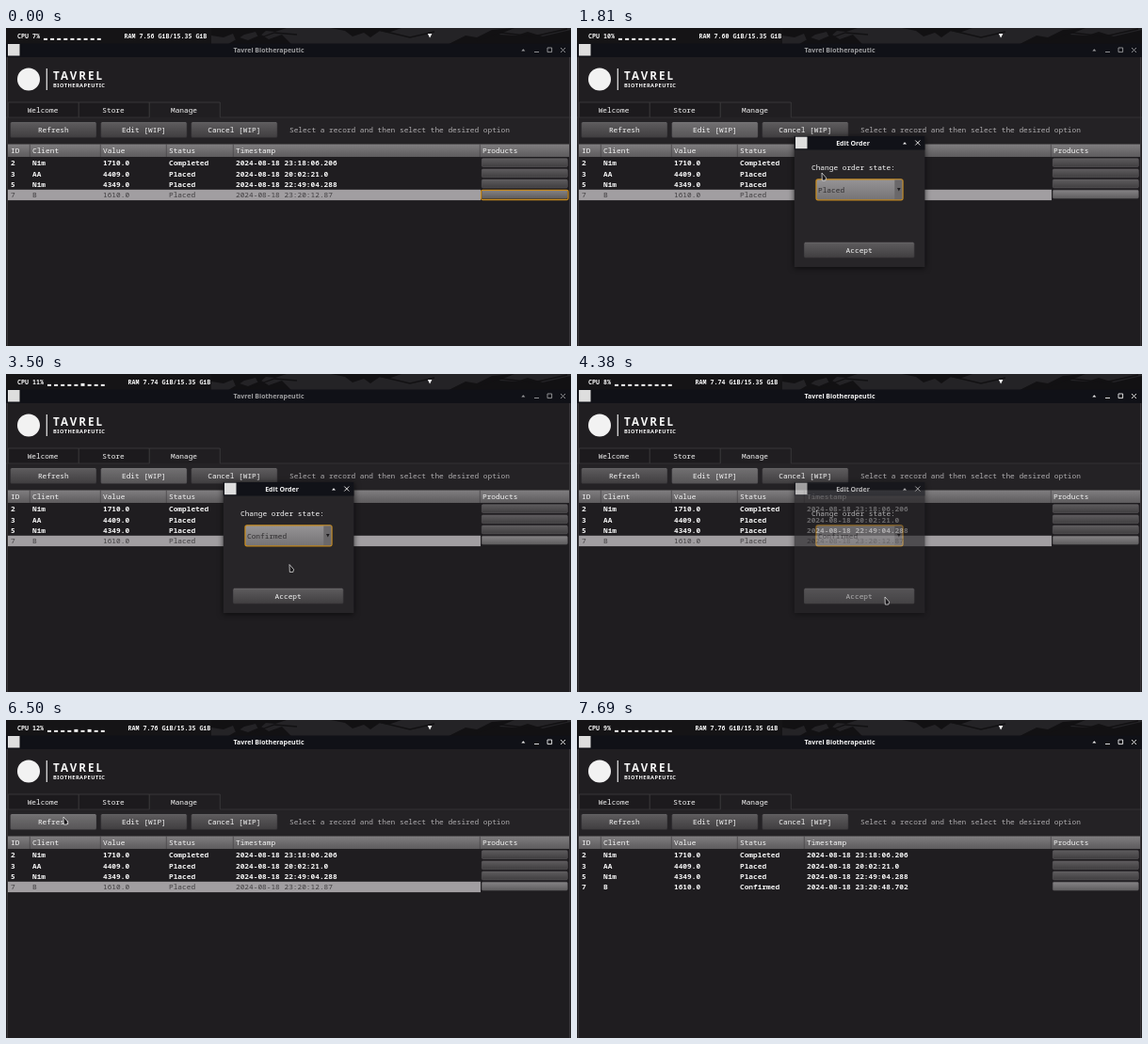
These frames come from a looping animation (600 px wide and 338 px high, 8 s). An HTML page:

```html
<!DOCTYPE html>
<html lang="en">
<head>
<meta charset="utf-8">
<title>Order manager</title>
<style>
html, body { margin: 0; width: 100%; height: 100%; overflow: hidden; background: #201e21; }
svg { display: block; width: 600px; height: 338px; }
text { font: 500 7.81px "Noto Sans Mono", monospace; fill: #f6f6f6; white-space: pre; }
.sans { font: 600 7px "Noto Sans", "Open Sans", sans-serif; }
.stat { font-size: 6.67px; font-weight: 700; }
.cell { font-weight: 600; }
.mid { text-anchor: middle; }
.window { filter: drop-shadow(0 1px 3px #000a); }
</style>
</head>
<body>
<svg id="stage" viewBox="0 0 600 338">
  <defs>
    <linearGradient id="btn" x2="0" y2="1"><stop stop-color="#5e5c5e"/><stop offset="1" stop-color="#403e40"/></linearGradient>
    <linearGradient id="lit" x2="0" y2="1"><stop stop-color="#858385"/><stop offset="1" stop-color="#5f5d5f"/></linearGradient>
    <linearGradient id="combo" x2="0" y2="1"><stop stop-color="#969496"/><stop offset="1" stop-color="#757375"/></linearGradient>
    <linearGradient id="head" x2="0" y2="1"><stop stop-color="#807e80"/><stop offset="1" stop-color="#5d5b5d"/></linearGradient>
  </defs>
</svg>
<script>
const stage = document.getElementById('stage');
const LOOP = 8000, STEP = 62.5;
const ORANGE = '#c58a20';

function add(tag, attrs, parent = stage) {
  const el = document.createElementNS('http://www.w3.org/2000/svg', tag);
  for (const k in attrs) el.setAttribute(k, attrs[k]);
  return parent.appendChild(el);
}
const rect = (x, y, width, height, fill, parent, more) =>
  add('rect', { x, y, width, height, fill, ...more }, parent);
const line = (d, stroke, parent, w = 1) =>
  add('path', { d, stroke, fill: 'none', 'stroke-width': w }, parent);
function text(x, y, str, cls = '', fill = '', parent) {
  const el = add('text', { x, y, class: cls }, parent);
  if (fill) el.style.fill = fill;
  el.textContent = str;
  return el;
}
const group = (parent, cls = '') => add('g', { class: cls }, parent);
const show = (el, on) => el.setAttribute('visibility', on ? 'visible' : 'hidden');

const buttons = [];
function button(x, y, w, label, parent) {
  rect(x, y, w, 16.4, 'url(#btn)', parent, { rx: 1.5, stroke: '#2f2d30', 'stroke-width': .5 });
  line(`M${x + 1} ${y + .6}h${w - 2}`, '#737173', parent, .6);
  const glow = rect(x, y, w, 16.4, '#fff', parent, { rx: 1.5, opacity: 0 });
  text(x + w / 2, y + 11, label, 'mid', '', parent);
  const b = { x, y, w, glow, inDialog: !!parent };
  buttons.push(b);
  return b;
}

// Desktop bar
rect(0, 0, 600, 17, '#151416');
rect(218, 0, 382, 17, '#242326');
add('path', { fill: '#121113', d:
  'M218 0h80l-12 4-10-1-8 7-3-6-12 3-9 6-3-7-10 4-13-2z' +
  'M236 17l12-7 9 3 14-6 8 5 14-5 10 10z' +
  'M345 0h75l-14 5-9-2-10 7-7-5-12 4-8-6z' +
  'M470 17l18-9 12 2 16-8 24-2-17 7 19 1 12-4 16 5 30-7v15z' });
line('M255 16l30-11 24 2M395 2l34 8 26-6M500 14l26-9 34 4 36-8', '#121113', stage, 1.3);
add('path', { d: 'M447.8 6h4.6l-2.3 4.4z', fill: '#f2f2f2' });
const cpu = text(12, 10.6, '', 'stat'), ram = text(0, 10.6, '', 'stat');
const bars = Array.from({ length: 9 }, () => rect(0, 0, 4, 2, '#f2f2f2'));

// Main window
rect(0, 16.5, 600, 14.5, '#101117');
rect(0, 31, 600, 307, '#201e21');
rect(2, 17, 12.5, 12.5, '#dedede');
const chrome = group();
text(279, 26, 'Tavrel Biotherapeutic', 'sans mid', '', chrome);
add('path', { d: 'M547.3 24.6l2-2.4 2 2.4z', fill: '#f2f2f2' }, chrome);
line('M561 25.5h5M575 21h4.6v4.6H575zM589 21l5 5m0-5l-5 5', '#f2f2f2', chrome, .9);

add('circle', { cx: 24, cy: 54.5, r: 12, fill: '#f2f2f2' });
line('M43.3 43v23', '#e8e8e8', stage, 1.2);
text(50, 55, 'TAVREL', 'sans').style.cssText =
  'font-size:11.6px;letter-spacing:2.1px;font-weight:600';
text(50, 63, 'BIOTHERAPEUTIC', 'sans').style.cssText =
  'font-size:5.7px;letter-spacing:.45px;font-weight:700';

rect(0, 95, 600, 29, '#242225');
['Welcome', 'Store', 'Manage'].forEach((name, i) => {
  const x = 2 + i * 75, on = i === 2;
  rect(x, 79, 75, 16, on ? '#201e21' : '#1c1a1d');
  line(`M${x + .3} 95V79h75V95`, '#434144', stage, .7);
  text(x + 37, 89.5, name, 'mid');
});
line('M0 95H152.3M227.3 95H600', '#3a383b', stage, .7);
button(4.6, 100, 91.4, 'Refresh');
const edit = button(100.7, 100, 91.4, 'Edit [WIP]');
button(196.7, 100, 91.4, 'Cancel [WIP]');
text(301, 111, 'Select a record and then select the desired option', '', '#b0aeb0');

// Orders table
const cols = [5, 28, 103, 173, 244, 506];
rect(2, 123.5, 596, 214.5, '#1f1d20');
rect(2, 123.5, 596, 13.5, 'url(#head)');
['ID', 'Client', 'Value', 'Status', 'Timestamp', 'Products'].forEach((name, i) => {
  text(cols[i], 133.3, name);
  if (i) line(`M${cols[i] - 2.7} 123.5v13.5`, '#454345', stage, .7);
});
const selection = rect(2, 171.8, 502, 11.3, '#a19ea1');
const rows = [
  ['2', 'Nim', '1710.0', 'Completed', '2024-08-18 23:18:06.206'],
  ['3', 'AA', '4409.0', 'Placed', '2024-08-18 20:02:21.0'],
  ['5', 'Nim', '4349.0', 'Placed', '2024-08-18 22:49:04.288'],
  ['7', 'B', '1610.0', 'Placed', '2024-08-18 23:20:12.87']
].map((row, r) => {
  const y = 146.3 + r * 11.2;
  rect(505.3, y - 7.6, 91, 8.8, r === 3 ? 'url(#lit)' : 'url(#btn)', stage,
    { rx: 1.3, stroke: '#625f62', 'stroke-width': .5 });
  return row.map((s, i) => text(cols[i], y, s, 'cell'));
});
const last = rows[3];
const focus = rect(504.6, 172.3, 92.4, 10.2, 'none', stage, { rx: 1.5, stroke: ORANGE, 'stroke-width': 1.3 });
line('M1.4 31V338M598.6 31V338', '#3b393c');

// Edit dialog
const dialog = group(stage, 'window');
rect(230.8, 115, 138.6, 139, '#272528', dialog);
rect(230.8, 115, 138.6, 14.5, '#111218', dialog);
rect(232, 115.7, 12.5, 12.5, '#dedede', dialog);
text(293, 125, 'Edit Order', 'sans mid', '', dialog);
add('path', { d: 'M346 123.6l2-2.4 2 2.4z', fill: '#f2f2f2' }, dialog);
line('M359.3 119.5l5 5m0-5l-5 5', '#f2f2f2', dialog, .9);
text(249, 151, 'Change order state:', '', '', dialog);
rect(254, 160.8, 92, 22, 'url(#combo)', dialog, { rx: 2, stroke: ORANGE, 'stroke-width': 1.3 });
rect(337.3, 161.5, 8, 20.6, '#6a686a', dialog);
add('path', { d: 'M340 170h3.6l-1.8 3.6z', fill: '#1d1b1e' }, dialog);
const state = text(256, 174.6, '', '', '#302e30', dialog);
button(241, 227.8, 117.3, 'Accept', dialog);

const popup = group(dialog);
rect(254, 183.5, 92, 34.5, '#39373a', popup, { stroke: '#151315', 'stroke-width': .7 });
const choice = rect(254.4, 0, 91.2, 11.3, '#858285', popup);
['Placed', 'Confirmed', 'Completed'].forEach((s, i) => text(256, 192.3 + i * 11.3, s, '', '', popup));

const pointer = add('path', { d: 'M0 0L4.6 5.2 3.8 8 .3 8Z', fill: '#19171a',
  stroke: '#f2f2f2', 'stroke-width': .7, 'stroke-linejoin': 'round' });

// time, x, y
const path = [
  [187, 497, 126], [375, 497, 126], [875, 177, 100], [1125, 152, 105], [1437, 152, 105],
  [1812, 260, 154], [1937, 296, 170], [2000, 296, 170], [2187, 301, 174], [2560, 301, 174],
  [3125, 301, 202.5], [3562, 301, 202.5], [4250, 327, 237], [4812, 327, 237], [4875, 328, 237.5],
  [5125, 328, 237.5], [5437, 415, 273], [5812, 415, 273], [6500, 61, 103], [6562, 58, 105],
  [6687, 58, 105], [7250, 364, 243.5], [7500, 364, 243.5], [7562, 450, 283], [7625, 551, 324]
];
function pointerAt(t) {
  const i = path.findIndex(p => p[0] > t);
  if (i < 1) return path[i < 0 ? path.length - 1 : 0].slice(1);
  const [t0, x0, y0] = path[i - 1], [t1, x1, y1] = path[i];
  const u = (t - t0) / (t1 - t0), e = u * u * (3 - 2 * u);
  return [x0 + (x1 - x0) * e, y0 + (y1 - y0) * e];
}

// time, CPU %, RAM in use, bar heights
const load = [
  [0, 7, '7.56', '222222222'], [120, 8, '7.60', '222222222'], [1500, 10, '7.60', '222222222'],
  [2120, 10, '7.74', '222222222'], [3000, 11, '7.74', '222223222'], [4000, 8, '7.74', '222222222'],
  [6000, 12, '7.76', '222232322'], [7000, 9, '7.76', '222222222']
];
const clamp = v => Math.max(0, Math.min(1, v));

function draw(t) {
  const [, use, mem, heights] = load.findLast(l => l[0] <= t);
  const shift = use > 9 ? 4 : 0;
  cpu.textContent = `CPU ${use}%`;
  ram.textContent = `RAM ${mem} GiB/15.35 GiB`;
  ram.setAttribute('x', 125.5 + shift);
  bars.forEach((b, i) => {
    const h = +heights[i];
    b.setAttribute('x', 40 + shift + i * 7.1);
    b.setAttribute('y', 12.9 - h);
    b.setAttribute('height', h);
  });

  const active = t > 1180 && t < 1400 || t > 4370;
  chrome.setAttribute('opacity', active ? 1 : .62);
  show(focus, t < 120);

  const saved = t > 6740;
  show(selection, !saved);
  last[3].textContent = saved ? 'Confirmed' : 'Placed';
  last[4].textContent = saved ? '2024-08-18 23:20:48.702' : '2024-08-18 23:20:12.87';
  last.forEach(el => {
    el.style.fill = saved ? '' : '#403e40';
    el.style.fontWeight = saved ? '' : 500;
  });

  const fade = Math.min(clamp((t - 1375) / 187), clamp((4500 - t) / 187));
  const modal = fade > 0;
  dialog.setAttribute('opacity', fade);
  state.textContent = t < 3120 ? 'Placed' : 'Confirmed';

  const [x, y] = pointerAt(t);
  const open = t > 2180 && t < 3120;
  show(popup, open);
  choice.setAttribute('y', y < 195 ? 183.9 : 195.2);
  pointer.setAttribute('transform', `translate(${x} ${y})`);
  show(pointer, t > 180 && t < 7680);

  // The button that opened the dialog stays lit behind it.
  for (const b of buttons) {
    const over = x > b.x && x < b.x + b.w && y >= b.y && y < b.y + 16;
    const lit = modal ? b === edit || over && b.inDialog : over && !b.inDialog;
    b.glow.setAttribute('opacity', lit ? .12 : 0);
  }
}

const start = performance.now();
function tick() {
  const t = (performance.now() - start) % LOOP;
  draw(Math.floor((t + 5) / STEP) * STEP % LOOP);
  requestAnimationFrame(tick);
}
tick();
</script>
</body>
</html>
```
